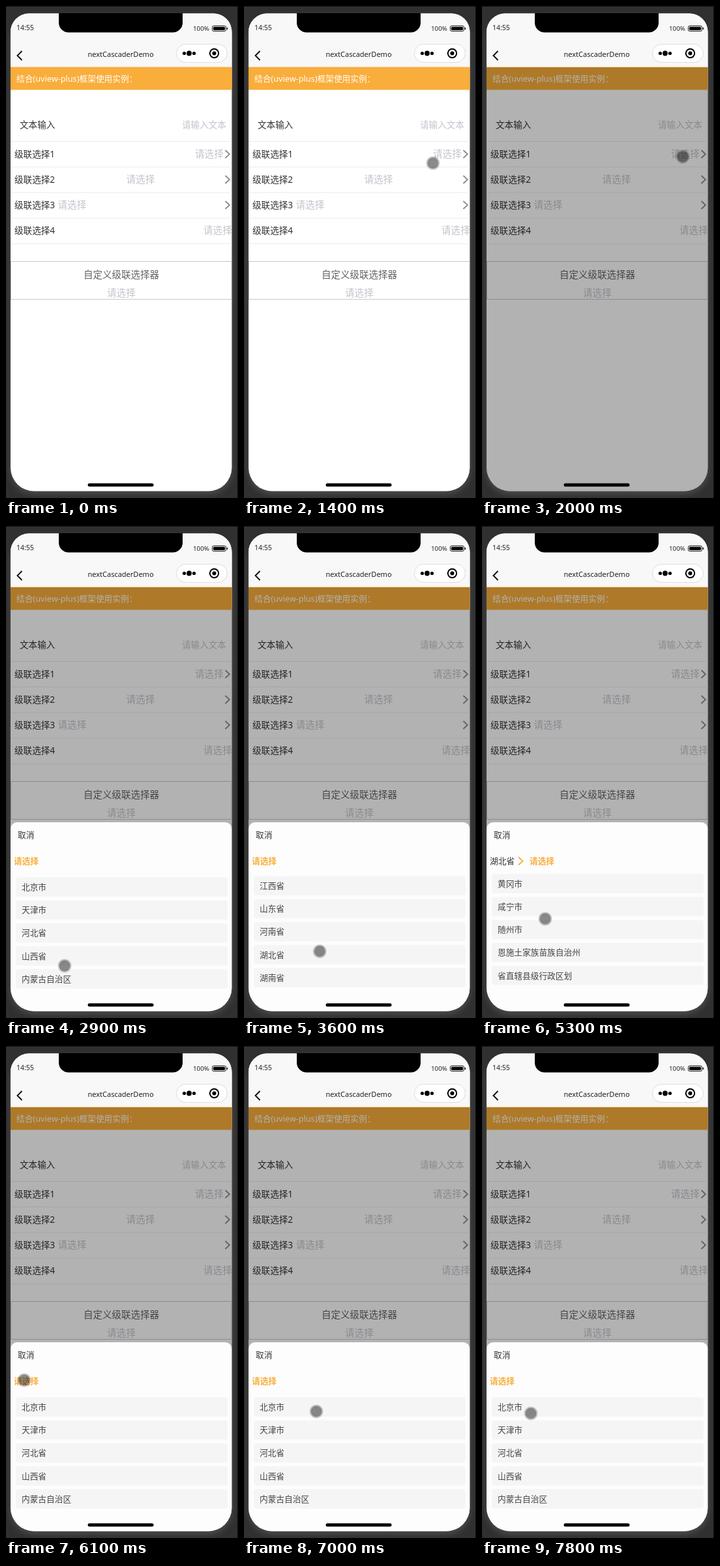
Animation of 356 by 754 pixels, one loop 8 s. Source, as an HTML page:

```html
<!DOCTYPE html>
<html lang="zh-CN">
<head>
<meta charset="utf-8">
<title>Cascader demo</title>
<style>
  html, body { margin: 0; width: 100%; height: 100%; overflow: hidden; background: #303030; }
  svg { display: block; width: 100vw; height: 100vh; font-family: "Noto Sans", "Noto Sans CJK SC", "Noto Sans CJK", sans-serif; }
  .chevron { fill: none; stroke: #8c8c8c; stroke-width: 1.8; }
  .bold { font-weight: 700; }
</style>
</head>
<body>
<svg viewBox="0 0 356 754">
  <defs>
    <clipPath id="screen"><path d="M7 40a28 28 0 0 1 28-28.500H318a28 28 0 0 1 28.500 28V708a36 36 0 0 1-36 35.500H43a36 36 0 0 1-36-35.500Z"/></clipPath>
    <clipPath id="listArea"><rect x="7" y="531" width="340" height="182"/></clipPath>
    <filter id="soft" x="-10%" y="-10%" width="120%" height="120%"><feGaussianBlur stdDeviation="4"/></filter>
  </defs>
  <rect width="356" height="754" fill="#303030"/>
  <rect x="7" y="16" width="340" height="732" rx="36" fill="#4c4c4c" filter="url(#soft)"/>
  <path d="M0 .5H356M355.5 0V754" stroke="#111"/>

  <g clip-path="url(#screen)">
    <rect width="356" height="754" fill="#fff"/>
    <rect width="356" height="94" fill="#f8f8f8"/>
    <g id="page">
      <rect y="93.5" width="356" height="35" fill="#f9ad3b"/>
      <rect x="7.5" y="391.5" width="338.5" height="58" fill="none" stroke="#c8c8c8"/>
    </g>
    <rect id="dim" y="94" width="356" height="660" opacity=".3"/>

    <g id="sheet">
      <rect x="7" y="454" width="339.5" height="310" rx="10" fill="#fdfdfd"/>
      <g id="provinceCrumb"></g>
      <g id="cityCrumb"></g>
      <g clip-path="url(#listArea)">
        <g id="provinces"></g>
        <g id="cities"></g>
      </g>
    </g>
    <rect x="125.5" y="731.5" width="101" height="5" rx="2.5"/>
  </g>

  <g id="header">
    <path d="M81 11V26a15 15 0 0 0 15 14.500H256a15 15 0 0 0 15-14.500V11Z"/>
    <rect x="316.5" y="30.5" width="21" height="8" rx="2" fill="none" stroke="#111"/>
    <rect x="318" y="32" width="18" height="5" rx="1"/>
    <path d="M339.5 33v3" stroke="#111" stroke-width="1.5"/>
    <path d="M24.5 69l-7 7 7 7" fill="none" stroke="#111" stroke-width="2"/>
    <rect x="261.5" y="58.5" width="78" height="28" rx="14" fill="#fff" stroke="#dcdcdc"/>
    <circle cx="273.5" cy="72.5" r="2.6"/><circle cx="281" cy="72.5" r="3.9"/><circle cx="288.5" cy="72.5" r="2.6"/>
    <circle cx="319.5" cy="72.5" r="6.7" fill="none" stroke="#000" stroke-width="2"/><circle cx="319.5" cy="72.5" r="3"/>
  </g>

  <g id="cursor">
    <circle r="10.5" fill-opacity=".2"/>
    <circle r="8.5" fill-opacity=".32"/>
  </g>
</svg>

<script>
const $ = id => document.getElementById(id);
const ORANGE = '#f9ad3b', DARK = '#333', HINT = '#c0c4cc';
const ROW = 35.2, CITY_SCROLL = 322;

function add(parent, tag, attrs, content = '') {
  const node = document.createElementNS('http://www.w3.org/2000/svg', tag);
  for (const name in attrs) node.setAttribute(name, attrs[name]);
  node.textContent = content;
  parent.appendChild(node);
}

// y is the vertical middle of the characters
function label(parent, x, y, size, fill, content, extra = {}) {
  add(parent, 'text', { x, y: y + size * 0.35, 'font-size': size, fill, ...extra }, content);
}

function chevron(parent, x, y, extra = {}) {
  add(parent, 'path', { class: 'chevron', d: `M${x} ${y - 6}l6.5 6-6.5 6`, ...extra });
}

function fillList(group, names) {
  names.split(' ').forEach((name, i) => {
    const y = 553.5 + i * ROW;
    add(group, 'rect', { x: 15, y: y - 15, width: 325, height: 29.5, rx: 4, fill: '#f5f5f5' });
    label(group, 24, y, 12.7, '#444', name);
  });
}

const page = $('page'), header = $('header'), cityCrumb = $('cityCrumb');
label(header, 16, 33, 10.5, '#222', '14:55');
label(header, 287, 35, 9.8, '#222', '100%');
label(header, 176, 74.5, 11, '#222', 'nextCascaderDemo', { 'text-anchor': 'middle' });

label(page, 16, 112, 12.7, '#fff', '结合(uview-plus)框架使用实例：');
label(page, 21, 182, 13.6, DARK, '文本输入');
label(page, 270, 182, 13.6, HINT, '请输入文本');
for (let i = 0; i < 5; i++) add(page, 'rect', { y: 207 + i * 39.2, width: 356, height: 1, fill: '#ebebeb' });
[290, 184.5, 79.5, 303].forEach((hintX, i) => {
  const y = 227 + i * 39;
  label(page, 13, y, 13.6, DARK, '级联选择' + (i + 1));
  label(page, hintX, y, 14.6, HINT, '请选择');
  if (i < 3) chevron(page, 336.5, y);
});
label(page, 119, 412, 14.5, '#606266', '自定义级联选择器');
label(page, 155, 440, 14.6, HINT, '请选择');

label($('sheet'), 18, 474, 12.7, DARK, '取消');
label($('provinceCrumb'), 12, 513.5, 12.7, ORANGE, '请选择', { class: 'bold' });
label(cityCrumb, 12, 513.5, 12.7, DARK, '湖北省');
chevron(cityCrumb, 56, 513.5, { style: `stroke: ${ORANGE}` });
label(cityCrumb, 73, 513.5, 12.7, ORANGE, '请选择', { class: 'bold' });

fillList($('provinces'), '北京市 天津市 河北省 山西省 内蒙古自治区 辽宁省 吉林省 黑龙江省 上海市 江苏省 浙江省 安徽省 福建省 江西省 山东省 河南省 湖北省 湖南省 广东省 广西壮族自治区 海南省 重庆市 四川省 贵州省 云南省 西藏自治区 陕西省 甘肃省 青海省 宁夏回族自治区 新疆维吾尔自治区');
fillList($('cities'), '武汉市 黄石市 十堰市 宜昌市 襄阳市 鄂州市 荆门市 孝感市 荆州市 黄冈市 咸宁市 随州市 恩施土家族苗族自治州 省直辖县级行政区划');

const progress = (t, start, end) => Math.min(1, Math.max(0, (t - start) / (end - start)));
const smooth = k => k * k * (3 - 2 * k);
const easeOut = k => 1 - (1 - k) ** 3;

function cursorAt(t) {
  let x = 350, y = 711;
  const glide = (start, end, toX, toY, ease = smooth) => {
    const k = ease(progress(t, start, end));
    x += (toX - x) * k;
    y += (toY - y) * k;
  };
  glide(600, 1700, 308, 231, easeOut);
  x -= 25 * Math.sin(Math.PI * progress(t, 600, 1700));
  glide(2200, 2900, 90, 674);
  glide(2900, 4200, 137, 644);
  y -= 95 * Math.sin(2 * Math.PI * progress(t, 2900, 4200)) ** 2; // two upward swipes
  glide(4200, 5100, 97, 602);
  glide(5300, 5900, 28, 512);
  glide(6200, 7000, 111, 560);
  glide(7000, 7800, 75, 563);
  return [x, y];
}

const show = (id, on) => $(id).setAttribute('visibility', on ? 'visible' : 'hidden');
const move = (id, x, y) => $(id).setAttribute('transform', `translate(${x} ${y})`);

function render(t) {
  const inCities = t >= 5300 && t < 6000;
  const scroll = t < 6000 ? 824 * smooth(progress(t, 2900, 4200)) - 309 * smooth(progress(t, 4600, 5100)) : 0;
  show('dim', t >= 2000);
  show('cursor', t >= 600);
  move('cursor', ...cursorAt(t));
  move('sheet', 0, 300 * (1 - easeOut(progress(t, 2000, 2400))));
  move('provinces', 0, -scroll);
  move('cities', 0, -CITY_SCROLL);
  for (const id of ['provinces', 'provinceCrumb']) show(id, !inCities);
  for (const id of ['cities', 'cityCrumb']) show(id, inCities);
}

// the screen refreshes ten times a second
function tick() {
  render(Math.floor(performance.now() % 8000 / 100) * 100);
  requestAnimationFrame(tick);
}
tick();
</script>
</body>
</html>
```
